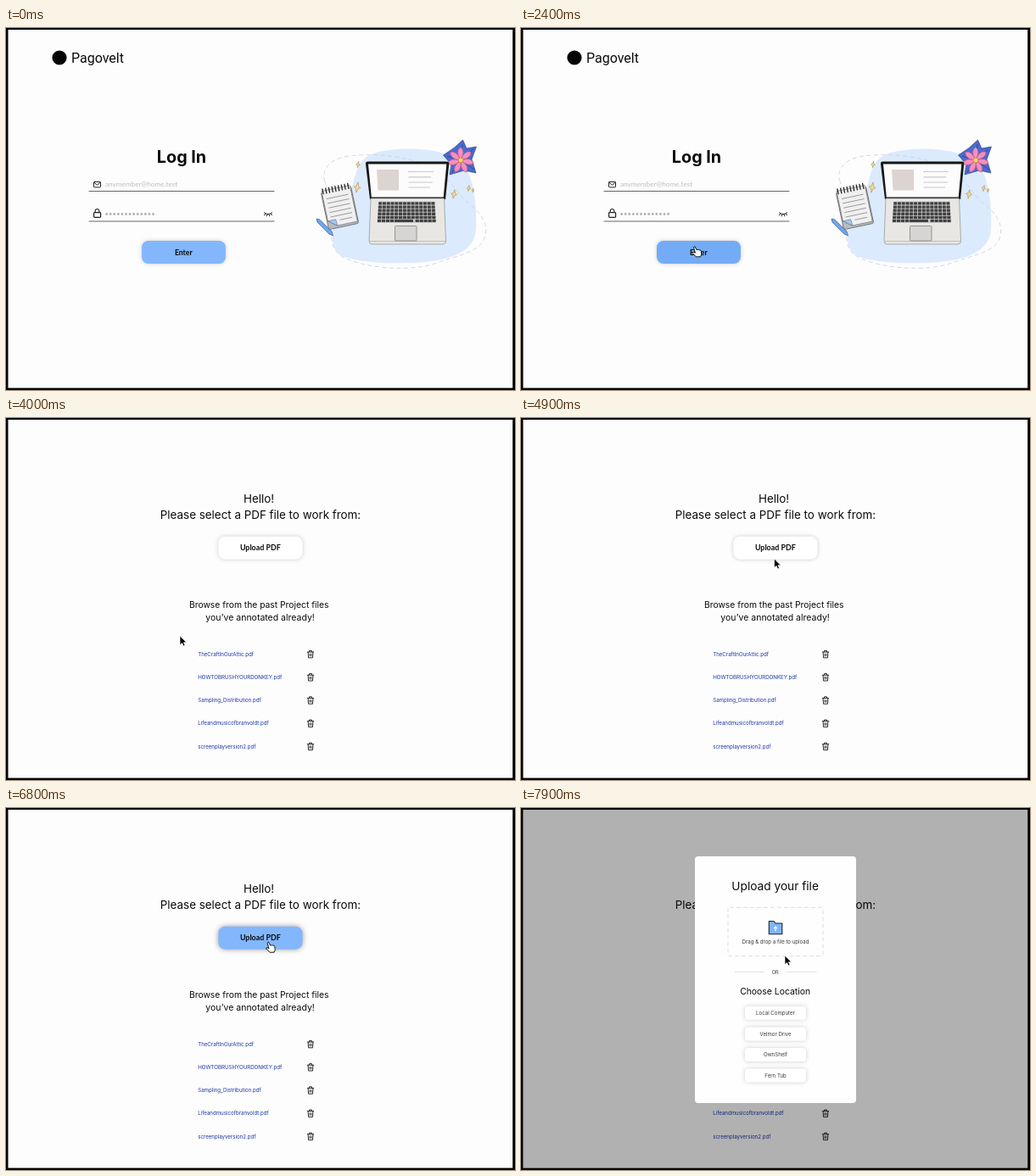
These frames come from a looping animation (600 by 427 pixels, 8 s). An HTML page:

```html
<!DOCTYPE html>
<html lang="en">
<head>
<meta charset="utf-8">
<title>Upload flow</title>
<style>
  html, body { margin: 0; width: 100%; height: 100%; overflow: hidden; background: #000; }
  svg { display: block; width: 600px; height: 427px; }
  text { font-family: Inter, "Open Sans", sans-serif; fill: #0b0b0b; }
  .lato { font-family: Lato, sans-serif; }
  .bold { font-weight: 700; }
  .mid { text-anchor: middle; }
  .link { font-size: 6.15px; fill: #1c36a6; }
  .small { font-size: 6.1px; fill: #3a3a3a; }
  .btn { filter: drop-shadow(0 0 2.5px rgba(0, 0, 0, .2)); }
  .btn.hot { filter: drop-shadow(0 .5px 3px rgba(0, 0, 0, .4)); }
  .line { fill: none; stroke: #222; stroke-linecap: round; stroke-linejoin: round; }
</style>
</head>
<body>
<svg viewBox="0 0 600 427" xmlns="http://www.w3.org/2000/svg">
  <rect width="600" height="427" fill="#000"/>
  <rect x="2.5" y="2" width="594.7" height="422.6" fill="#fefdfe"/>

  <g id="login">
    <circle cx="63" cy="35" r="8.6" fill="#050505"/>
    <text x="77" y="40.5" style="font:16px Roboto,sans-serif">Pagovelt</text>
    <text class="mid bold" x="207" y="159" font-size="19.8">Log In</text>

    <g class="line">
      <path d="M98 192.5H316M98 228H316" stroke="#666" stroke-width="1"/>
      <rect x="103.5" y="181.5" width="8" height="6.4" rx=".8"/>
      <path d="M103.8 182.2 107.5 185.2 111.2 182.2"/>
      <rect x="103.6" y="217.6" width="8" height="5.8" rx=".8" stroke-width="1.2"/>
      <path d="M105.2 217.5V215.8a2.3 2.3 0 0 1 4.6 0V217.5" stroke-width="1.1"/>
      <path d="M304.5 217.8Q309 221.6 313.5 217.8M305.6 219.2 304.6 220.8M307.8 220.2 307.4 221.8M310.2 220.2 310.6 221.8M312.4 219.2 313.4 220.8"/>
    </g>
    <text class="lato" x="117" y="187.2" font-size="8.2" style="fill:#bdbdbd">anymember@home.test</text>
    <path d="M118.6 219.5H174" fill="none" stroke="#b2b2b2" stroke-width="2.9" stroke-linecap="round" stroke-dasharray="0 4.58"/>

    <rect id="enter" class="btn" x="160" y="251" width="99" height="27" rx="8" fill="#83b7fd"/>
    <text class="mid bold lato" x="209.3" y="267.6" font-size="8.7">Enter</text>

    <path d="M385 246C384 222 402 202 409 184C414 164 417 151 440 146C471 139 518 142 536 158C552 173 555 208 554 237C553 257 537 268 514 273C480 280 407 279 392 266C386 261 385 254 385 246Z" fill="#dceafd"/>
    <path d="M376 181C371 168 381 154 404 151C438 147 469 152 491 160C522 171 526 189 543 205C559 217 570 231 564 248C558 265 532 268 508 277C478 288 424 284 397 270C380 261 385 244 383 228C381 210 381 195 376 181Z" fill="none" stroke="#cbd4df" stroke-width=".9" stroke-dasharray="5 3.5"/>

    <g id="flower" stroke="#23376f" stroke-width=".6">
      <path d="M515.5 150 528 141.5 538.5 132 543 142 554.5 140 549 155 554 171 540 168 523 173 525 161Z" fill="#4a6bd0"/>
      <path d="M520 151 536 156 538 137M552 167 536 156 526 170M536 156 551 143" fill="none"/>
    </g>

    <path d="M426.5 157.5H519.5Q522.5 157.5 522.2 160.5L518 202H429L424 160.5Q423.7 157.5 426.5 157.5Z" fill="#161616"/>
    <path d="M427 160.5H519.3L515.7 199.5H430.8Z" fill="#fcfcfc"/>
    <path d="M437 167H463V191.5H438.6Z" fill="#ddd3d1"/>
    <path d="M474 169.5H504M474.5 175.8H501M474.5 182H503M474.5 188H500" stroke="#c9c9c9" stroke-width="1.2"/>
    <path d="M430 201H516.5L518.5 251Q518.5 255 515 255H431.5Q428 255 428 251Z" fill="#e9e7e4" stroke="#8f8f8f" stroke-width=".7"/>
    <path d="M428.3 251.6H518.2" stroke="#bdbbb8" stroke-width="1"/>
    <path d="M439 204.5H505.5L507 230H437.5Z" fill="#c9c7c5"/>
    <g id="keys" fill="#414143"></g>
    <rect x="458.5" y="233.5" width="25.5" height="17.5" rx="1" fill="#d7d5d3" stroke="#858585" stroke-width=".8"/>

    <g transform="translate(370 193) rotate(-12)">
      <rect x="1" y="1.5" width="36" height="44.5" rx="2" fill="#b9bbc0" stroke="#555" stroke-width=".7"/>
      <path d="M2 0H36V43.5H12L2 36Z" fill="#f1f0f0" stroke="#666" stroke-width=".6"/>
      <path d="M2 36H11.5L12 43.5Z" fill="#a9c8f2" stroke="#5877a8" stroke-width=".6"/>
      <path d="M6 10H32M6 15.5H32M6 21H32M6 26.5H32M6 32H32M16 37.5H31" stroke="#8c8c8c" stroke-width=".8"/>
      <path d="M3.5 3.5V-2.5M7.3 3.5V-2.5M11.1 3.5V-2.5M14.9 3.5V-2.5M18.7 3.5V-2.5M22.5 3.5V-2.5M26.3 3.5V-2.5M30.1 3.5V-2.5M33.9 3.5V-2.5" class="line" stroke-width="1.3"/>
    </g>
    <path d="M366 225 369.5 225.8 384 240 385.5 245 380.5 242.8 367 229Z" fill="#72a6ea" stroke="#355a94" stroke-width=".7"/>
    <g id="stars" fill="#f8d98f" stroke="#a08450" stroke-width=".5"></g>
  </g>

  <g id="files">
    <text class="mid" x="298" y="99.5" font-size="13.4">Hello!</text>
    <text class="mid" x="300" y="119.3" font-size="13.4">Please select a PDF file to work from:</text>
    <rect id="upload" class="btn" x="250.3" y="139.7" width="99.2" height="27" rx="8" fill="#fff"/>
    <text class="mid bold lato" x="299.8" y="156.4" font-size="8.9">Upload PDF</text>
    <text class="mid" x="298.2" y="224" font-size="10.3">Browse from the past Project files</text>
    <text class="mid" x="299.6" y="239" font-size="10.5">you’ve annotated already!</text>
  </g>

  <g id="modal">
    <rect x="2.5" y="2" width="594.7" height="422.6" fill="#000" opacity=".3"/>
    <rect x="205" y="57" width="190" height="291" rx="4" fill="#fefefe"/>
    <text class="mid" x="299.6" y="97" font-size="13.7">Upload your file</text>
    <rect x="244" y="117.3" width="112" height="57.4" rx="2" fill="none" stroke="#dcdcdc" stroke-width=".9" stroke-dasharray="5 3"/>
    <path d="M292.3 133.5H298L300 136H307.8V148.8H292.3Z" fill="#7fb5fb" stroke="#17233c" stroke-width="1.1" stroke-linejoin="round"/>
    <path d="M300 145.3V140.2M297.9 142.2 300 140 302.1 142.2" fill="none" stroke="#fff" stroke-width="1.1"/>
    <text class="mid small" x="300" y="159.8">Drag &amp; drop a file to upload</text>
    <path d="M251.5 193.3H287M313 193.3H348.5" stroke="#d9d9d9" stroke-width=".8"/>
    <text class="mid small" x="299.7" y="195.8" style="font-size:5.6px">OR</text>
    <text class="mid" x="299.6" y="220" font-size="10.4">Choose Location</text>
  </g>

  <g id="cursor">
    <path id="arrow" d="M0 0V10.6L2.5 8.4 4.2 12 6 11.2 4.4 7.7H7.7Z" fill="#000" stroke="#fff" stroke-width=".7"/>
    <path id="hand" d="M-1.4 1.2Q-1.2-.2 .1 .2L2.1 4.2Q3.3 3.2 4 4.2 5.1 3.3 5.7 4.4 7 4 7.2 5.4L7.8 9.2 6.6 12.2H1.4L-2.7 8Q-3.2 6.6-1.7 6.7L.4 7.6Z" fill="#fff" stroke="#111" stroke-width="1" stroke-linejoin="round"/>
  </g>
</svg>
<script>
const $ = id => document.getElementById(id);
const add = (parent, html) => $(parent).insertAdjacentHTML('beforeend', html);

// keyboard
for (let row = 0; row < 6; row++)
  for (let i = 0; i < 14; i++) {
    if (row === 5 && i > 4 && i < 9) continue;
    const left = 439.2 - row * .25, pitch = (67 + row * .5) / 14;
    add('keys', `<rect x="${left + i * pitch}" y="${205.3 + row * 4.1}" width="${pitch - .8}" height="3.3" rx=".5"/>`);
  }
add('keys', '<rect x="461.5" y="225.8" width="18.5" height="3.3" rx=".5"/>');

// flower petals
for (let i = 0; i < 7; i++)
  add('flower', `<path transform="rotate(${i * 360 / 7} 536 156)" d="M536 156Q529 145 536 140.5 542 145 536 156Z" fill="#f58fc0" stroke="#b84f86"/>`);
add('flower', '<circle cx="536" cy="156" r="3" fill="#f5cf6d" stroke="#a2762f"/>');

// sparkles
for (const [x, y, r] of [[414, 188, 6.3], [415, 161, 3.8], [528, 196, 5.5], [545.5, 189, 3.6], [550.5, 191.5, 2.4]]) {
  const k = r * .22;
  add('stars', `<path transform="translate(${x} ${y}) rotate(10)" d="M0 ${-r}L${k} ${-k} ${r * .65} 0 ${k} ${k} 0 ${r} ${-k} ${k} ${-r * .65} 0 ${-k} ${-k}Z"/>`);
}

// file list with bins
['TheCraftInOurAttic', 'HOWTOBRUSHYOURDONKEY', 'Sampling_Distribution', 'Lifeandmusicofbranvoldt', 'screenplayversion2']
  .forEach((name, i) => {
    const y = 278.6 + i * 27.2;
    add('files', `<text class="link" x="226.2" y="${y + 2.1}">${name}.pdf</text>
      <path class="line" transform="translate(359 ${y})" stroke-width=".95"
        d="M-3.7-2.6H3.7M-1.4-2.8V-4.2H1.4V-2.8M-2.9-2.4-2.5 4.2H2.5L2.9-2.4M-.9-.4V2.2M.9-.4V2.2"/>`);
  });

// storage choices
['Local Computer', 'Velmor Drive', 'OwnShelf', 'Fern Tub'].forEach((name, i) => {
  const y = 233.8 + i * 24.6;
  add('modal', `<rect class="btn" x="264" y="${y}" width="72" height="16" rx="4" fill="#fff"/>
    <text class="mid small" x="300" y="${y + 10.2}">${name}</text>`);
});

// cursor path: time, x, y
const path = [
  [500, 487, 381], [600, 475, 376], [900, 475, 376], [1000, 448, 373], [1100, 385, 350],
  [1200, 312, 322], [1300, 261, 303], [1400, 236, 290], [1500, 221, 279], [1600, 211, 268],
  [1800, 205, 258], [2700, 205, 257.5], [4300, 205, 257], [4400, 212, 250], [4500, 232, 231],
  [4700, 276, 188], [4800, 290, 174], [4900, 298.5, 166], [5000, 304, 162], [5200, 309.5, 158],
  [6900, 309.5, 158], [7000, 309.5, 157], [7700, 309.5, 157], [7900, 311, 174]
];

function at(t) {
  const i = path.findIndex(p => p[0] > t);
  if (i < 0) return path[path.length - 1].slice(1);
  const a = path[Math.max(0, i - 1)], b = path[i];
  const k = Math.max(0, (t - a[0]) / (b[0] - a[0]));
  return [a[1] + (b[1] - a[1]) * k, a[2] + (b[2] - a[2]) * k];
}

const show = (id, on) => $(id).style.display = on ? '' : 'none';
const start = performance.now();

function draw(now) {
  const t = Math.floor(Math.max(0, now - start) % 8000 / 100) * 100;
  const onEnter = t >= 1600 && t < 2700, onUpload = t >= 5000 && t < 7000;
  show('login', t < 2700);
  show('files', t >= 2700);
  show('modal', t >= 7000);
  show('cursor', t >= 500);
  show('hand', onEnter || onUpload);
  show('arrow', !onEnter && !onUpload);
  $('enter').setAttribute('fill', onEnter ? '#74abf6' : '#83b7fd');
  $('upload').setAttribute('fill', onUpload ? '#83b7fd' : '#fff');
  $('upload').classList.toggle('hot', onUpload);
  $('cursor').setAttribute('transform', `translate(${at(t).join(' ')})`);
  requestAnimationFrame(draw);
}
draw(start);
</script>
</body>
</html>
```
